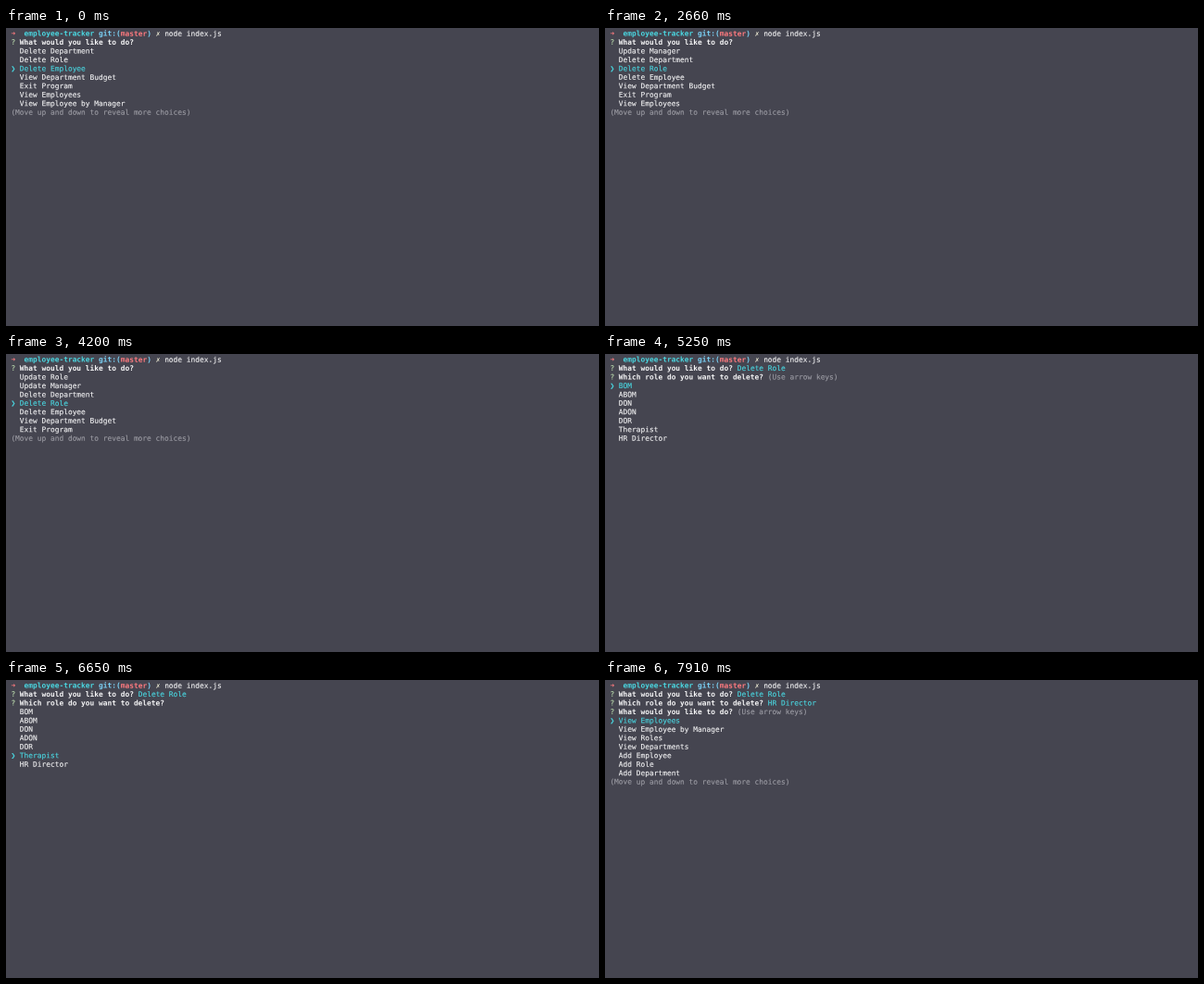
Write an HTML page that moves like this. It is 640 px wide and 322 px high and loops after 8000 ms.

```html
<!DOCTYPE html>
<html lang="en">
<head>
<meta charset="utf-8">
<title>Employee tracker</title>
<style>
html, body { margin: 0; width: 100%; height: 100%; overflow: hidden; background: #454550; }
svg { display: block; width: 100%; height: 100%; }
text {
  font: 7.87px "DejaVu Sans Mono", "Liberation Mono", monospace;
  text-rendering: geometricPrecision;
  white-space: pre;
  color: #f5f5f6;
  fill: currentColor;
  stroke: currentColor;
  stroke-width: .12px;
}
.bold { font-weight: bold; stroke: none; }
.cyan { color: #4ad8e2; }
.blue { color: #7ad0f4; }
.red { color: #ff7a7f; }
.green { color: #bcdcae; }
.yellow { color: #eeecd4; }
.gray { color: #9c9ca4; }
</style>
</head>
<body>
<svg viewBox="0 0 640 322" preserveAspectRatio="xMinYMin meet">
  <!-- the tiny skew keeps baselines from snapping to whole pixels -->
  <g id="term" transform="skewY(.035)"></g>
</svg>
<script>
const LOOP = 8000, LEFT = 5.4, BASE = 8.55, COL = 4.735, ROW = 9.46, PAGE = 7;
const term = document.getElementById("term");

const actions = [
  "View Employees", "View Employee by Manager", "View Roles", "View Departments",
  "Add Employee", "Add Role", "Add Department", "Update Role", "Update Manager",
  "Delete Department", "Delete Role", "Delete Employee", "View Department Budget", "Exit Program"
];
const roles = ["BOM", "ABOM", "DON", "ADON", "DOR", "Therapist", "HR Director"];

// A line is a list of [column, text, classes].
const shell = [
  [0, "➜", "red bold"], [3, "employee-tracker", "cyan bold"], [20, "git:(", "blue bold"],
  [25, "master", "red bold"], [31, ")", "blue bold"], [33, "✗", "yellow bold"],
  [35, "node index.js", ""]
];
const ask = (question, note = "", style = "cyan") => [
  [0, "?", "green"], [2, question, "bold"], [question.length + 3, note, style]
];
const askAction = (...note) => ask("What would you like to do?", ...note);
const askRole = (...note) => ask("Which role do you want to delete?", ...note);
const keysHint = ["(Use arrow keys)", "gray"];

// Shows one page of a circular list with the chosen item on the given row.
function choices(list, chosen, row) {
  const start = list.indexOf(chosen) - row + list.length;
  const lines = Array.from({ length: PAGE }, (_, i) => {
    const item = list[(start + i) % list.length];
    return i === row ? [[0, "❯", "cyan"], [2, item, "cyan"]] : [[2, item, ""]];
  });
  if (list.length > PAGE) lines.push([[0, "(Move up and down to reveal more choices)", "gray"]]);
  return lines;
}

const actionMenu = (item, row) => [shell, askAction(), ...choices(actions, item, row)];
const roleMenu = (row, ...hint) => [
  shell, askAction("Delete Role"), askRole(...hint), ...choices(roles, roles[row], row)
];

const steps = [
  [0, actionMenu("Delete Employee", 2)],
  [1330, actionMenu("Delete Role", 2)],
  [2730, actionMenu("Delete Department", 2)],
  [3010, actionMenu("Delete Role", 3)],
  [4270, roleMenu(0, ...keysHint)],
  ...[1, 2, 3, 4, 5, 6].map(row => [5040 + 280 * row, roleMenu(row)]),
  [7000, [
    shell, askAction("Delete Role"), askRole("HR Director"), askAction(...keysHint),
    ...choices(actions, "View Employees", 0)
  ]]
];

function draw(lines) {
  const nodes = [];
  lines.forEach((line, row) => {
    for (const [col, str, style] of line) {
      if (!str) continue;
      const node = document.createElementNS("http://www.w3.org/2000/svg", "text");
      node.setAttribute("x", LEFT + col * COL);
      node.setAttribute("y", BASE + row * ROW);
      node.setAttribute("class", style);
      node.textContent = str;
      nodes.push(node);
    }
  });
  term.replaceChildren(...nodes);
}

let shown = null;
function frame() {
  const time = performance.now() % LOOP;
  const step = steps.findLast(([start]) => start <= time);
  if (step !== shown) draw((shown = step)[1]);
  requestAnimationFrame(frame);
}
frame();
</script>
</body>
</html>
```
